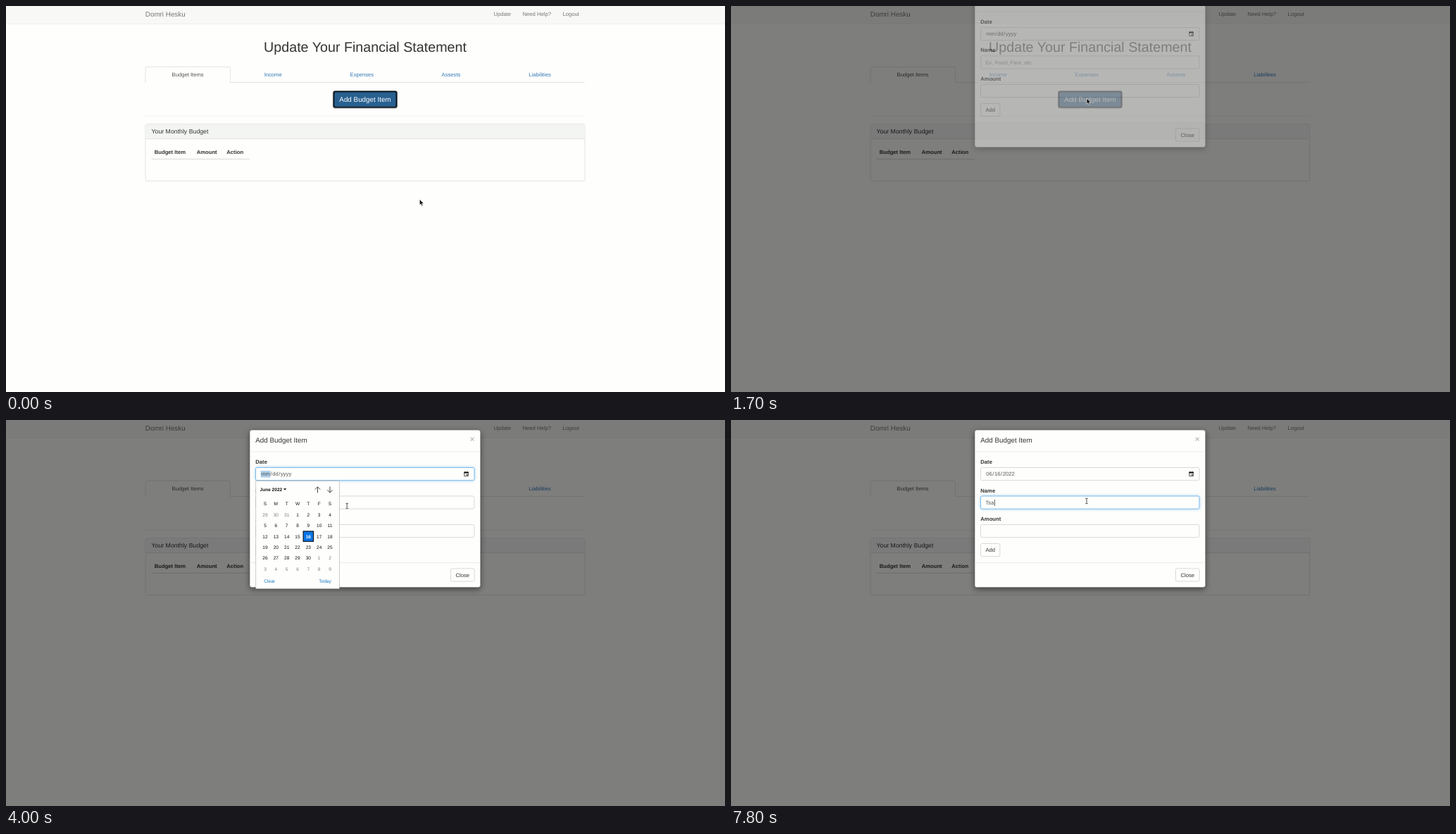
An HTML page for the animation above (8 s loop, 1021 by 548 pixels).

```html
<!DOCTYPE html>
<html lang="en">
<head>
<meta charset="utf-8">
<title>Budget form</title>
<style>
html, body { margin: 0; width: 100%; height: 100%; overflow: hidden; background: #fefefc; }
svg { display: block; width: 1021px; height: 548px; }
text {
  font-family: "Liberation Sans", Arial, sans-serif;
  font-size: 7.66px;
  fill: #333;
  text-rendering: geometricPrecision;
  white-space: pre;
}
.b { font-weight: bold; }
.mid { text-anchor: middle; }
.big { font-size: 9.85px; }
.cal text { font-size: 6.56px; fill: #111; }
</style>
</head>
<body>
<svg id="stage" viewBox="0 0 1021 548" xmlns="http://www.w3.org/2000/svg"></svg>
<script>
const LOOP = 8000, STEP = 100;
const WHITE = '#fefefc', LINK = '#337ab7', GREY = '#777';

// ---------- markup helpers ----------
const text = (x, y, s, cls = '', fill = '', extra = '') =>
  `<text x="${x}" y="${y}" class="${cls}" ${fill && `style="fill:${fill}"`} ${extra}>${s}</text>`;
const rect = (x, y, w, h, fill, extra = '') =>
  `<rect x="${x}" y="${y}" width="${w}" height="${h}" fill="${fill}" ${extra}/>`;
const line = (x1, x2, y, color, w = .6) =>
  `<path d="M${x1} ${y}H${x2}" stroke="${color}" stroke-width="${w}"/>`;
const box = (x, y, w, h, stroke, r = 2.2, extra = '') =>
  rect(x, y, w, h, WHITE, `rx="${r}" stroke="${stroke}" stroke-width=".65" ${extra}`);

// ---------- page behind the dialog ----------
function page() {
  const tabs = [['Income', 379.2], ['Expenses', 505.4], ['Assests', 632], ['Liabilities', 758]];
  return rect(0, 0, 1021, 548, WHITE) +
    rect(0, 0, 1021, 25.3, '#f8f8f6') + line(0, 1021, 25.4, '#e2e2e2') +
    text(197.8, 15, 'Domri Hesku', 'big', GREY) +
    text(692.4, 14.3, 'Update', '', GREY) +
    text(733.5, 14.3, 'Need Help?', '', GREY) +
    text(790.4, 14.3, 'Logout', '', GREY) +
    text(510, 65.1, 'Update Your Financial Statement', 'mid', '', 'font-size="19.7" id="title"') +
    line(198, 822, 108.5, '#d6d6d6') +
    `<path d="M198 108.9V88.6a2.2 2.2 0 0 1 2.2-2.2H316.4a2.2 2.2 0 0 1 2.2 2.2V108.9"
      fill="${WHITE}" stroke="#d6d6d6" stroke-width=".65"/>` +
    text(258.1, 100.3, 'Budget Items', 'mid', '#555') +
    tabs.map(([s, x]) => text(x, 100.3, s, 'mid', LINK)).join('') +
    rect(463.9, 120, 92.2, 25.4, '#8d9094', 'rx="3.6"') +
    rect(464.7, 120.8, 90.6, 23.8, '#0e1216', 'rx="3"') +
    rect(466.3, 122.3, 87.4, 20.8, '#286090', 'rx="1.8" stroke="#122b40" stroke-width=".5" id="addButton"') +
    text(510, 136, 'Add Budget Item', 'big mid', '#fff') +
    line(198, 822, 156.3, '#e8e8e8') +
    box(198, 167.7, 624, 80.7, '#d6d6d6') +
    rect(198.4, 168, 623.2, 20.6, '#f3f5f3') + line(198, 822, 188.6, '#d6d6d6') +
    text(206.5, 181.3, 'Your Monthly Budget', '', '', 'style="font-size:8.76px"') +
    text(210.8, 209.8, 'Budget Item', 'b') +
    text(270.7, 209.8, 'Amount', 'b') +
    text(313.3, 209.8, 'Action', 'b') +
    line(206.5, 346, 217.2, '#d6d6d6', 1.1);
}

// ---------- dialog ----------
const field = (y, id) =>
  rect(354.3, y, 311, 18.6, '#66afe9', `rx="2.2" filter="url(#glow)" id="${id}Glow"`) +
  box(354.5, y + .2, 310.5, 18.2, '#c4c4c4', 2.2, `id="${id}Box"`);

function dialog() {
  const icon = `<path d="M650.8 74.2h5.6v5.4h-5.6z" fill="none" stroke="#111" stroke-width=".7"/>` +
    rect(650.5, 73.7, 6.2, 1.9, '#111') + rect(651.5, 73, .8, 1, '#111') + rect(654.9, 73, .8, 1, '#111') +
    rect(653.9, 77, 1.6, 1.6, '#111');
  return rect(346.2, 16.9, 327.4, 223.4, '#000', 'rx="3.3" opacity=".5" filter="url(#shade)"') +
    rect(346.2, 14.2, 327.4, 223.4, WHITE, 'rx="3.3" stroke="#000" stroke-opacity=".25" stroke-width=".55"') +
    text(354.3, 32.4, 'Add Budget Item', 'big') +
    text(662, 31.3, '×', 'b mid', '#000', 'opacity=".25" id="cross"') +
    line(346.4, 673.4, 45, '#e0e0e0') +
    text(354.3, 62, 'Date', 'b') + field(67.3, 'date') +
    rect(361.7, 72, 10, 9.6, '#afd0ea', 'id="mark"') + '<g id="dateText"></g>' + icon +
    text(354.3, 102.5, 'Name', 'b') + field(107.8, 'name') +
    text(361.5, 119.9, '', '', '', 'id="nameText"') +
    rect(361.4, 113, .7, 9, '#222', 'id="caret"') +
    text(354.3, 143, 'Amount', 'b') + box(354.5, 148.5, 310.5, 18.2, '#c4c4c4') +
    box(354.5, 175.5, 27.4, 18.2, '#c4c4c4') + text(368.2, 187.3, 'Add', 'mid') +
    line(346.4, 673.4, 202.5, '#e0e0e0') +
    box(631.4, 210.9, 33.7, 18.2, '#c4c4c4') + text(648.3, 222.7, 'Close', 'mid');
}

// ---------- date picker ----------
function calendar() {
  const pitch = 15.33, left = 368, top = 134.5;
  const arrow = (x, turn) => `<path transform="translate(${x} 99) rotate(${turn})"
    d="M0 4.4V-4M-3.7 -.4L0 -4.1L3.7 -.4" fill="none" stroke="#333" stroke-width=".9"/>`;
  let s = text(360.5, 100.9, 'June 2022', 'b') +
    '<path d="M393.9 97.3h4.4l-2.2 2.5z" fill="#111"/>' + arrow(442.5, 0) + arrow(460, 180);
  [...'SMTWTFS'].forEach((d, i) => s += text(left + i * pitch, 121.1, d, 'mid'));
  for (let i = 0; i < 42; i++) {
    const n = i - 2;
    const x = left + i % 7 * pitch, y = top + Math.floor(i / 7) * pitch;
    const inMonth = n >= 1 && n <= 30;
    const label = n < 1 ? n + 31 : n > 30 ? n - 30 : n;
    if (n === 16) s += rect(x - 7.2, y - 7.2, 14.4, 14.4, '#0a75e8', 'stroke="#0a0a0a" stroke-width="1.1"');
    s += text(x, y + 2.35, label, n === 16 ? 'mid b' : 'mid', n === 16 ? '#fff' : inMonth ? '' : '#7d7d7d');
  }
  return s + text(374.2, 230.6, 'Clear', 'mid', '#1273bd') + text(453, 230.6, 'Today', 'mid', '#1273bd');
}

const pointers = `
  <path id="arrow" d="M0 0V8.2L1.9 6.5L3.2 9.6L4.7 9L3.4 6H5.9Z" fill="#111" stroke="#fff" stroke-width=".6"/>
  <path id="hand" d="M-.8 .2Q0 -.7 .8 .2V3.2L4 4Q5 4.3 4.9 5.4L4.2 9H-.6L-3 5.6Q-2.4 4.4 -.8 5.6Z"
    fill="#111" stroke="#fff" stroke-width=".6"/>
  <g id="beam" fill="none">
    <path d="M-1.8 -3.8Q0 -3.8 0 -3V3Q0 3.8 -1.8 3.8M1.8 -3.8Q0 -3.8 0 -3M0 3Q0 3.8 1.8 3.8" stroke="#fff" stroke-width="1.6"/>
    <path d="M-1.8 -3.8Q0 -3.8 0 -3V3Q0 3.8 -1.8 3.8M1.8 -3.8Q0 -3.8 0 -3M0 3Q0 3.8 1.8 3.8" stroke="#222" stroke-width=".8"/>
  </g>`;

const stage = document.getElementById('stage');
stage.innerHTML = `<defs>
    <filter id="glow" x="-5%" y="-60%" width="110%" height="220%"><feGaussianBlur stdDeviation="2.2"/></filter>
    <filter id="shade" x="-10%" y="-15%" width="120%" height="130%"><feGaussianBlur stdDeviation="4.1"/></filter>
  </defs>
  ${page()}
  ${rect(0, 0, 1021, 548, '#000', 'id="dim"')}
  <g id="dialog">${dialog()}</g>
  <g id="popup" class="cal">${rect(354.8, 86.7, 118.5, 152.8, WHITE, 'stroke="#a9a9a9" stroke-width=".6"')}
    <g id="days">${calendar()}</g></g>
  <g id="pointer">${pointers}</g>`;

const $ = id => document.getElementById(id);
$('title').style.fontSize = '19.7px';
$('cross').style.fontSize = '11.5px';

// ---------- motion ----------
const clamp = v => Math.max(0, Math.min(1, v));
const show = (id, on) => $(id).setAttribute('visibility', on ? 'inherit' : 'hidden');

// cubic-bezier(0, 0, .58, 1)
function easeOut(x) {
  let lo = 0, hi = 1;
  for (let i = 0; i < 24; i++) {
    const u = (lo + hi) / 2;
    if (1.74 * (1 - u) * u * u + u ** 3 < x) lo = u; else hi = u;
  }
  return 3 * (1 - lo) * lo * lo + lo ** 3;
}

// time, x, y
const path = [
  [300, 587.3, 274.4], [400, 584, 266], [600, 546, 205], [800, 513, 147], [1000, 505, 131],
  [2200, 505, 131], [2400, 482, 123], [2500, 528, 108], [2700, 611.4, 84.2], [2900, 638, 78.4],
  [3000, 638, 78.4], [3300, 651.3, 75], [3600, 651.3, 75], [3700, 640, 80], [3900, 530, 112],
  [4000, 484.2, 122], [4200, 443, 148], [4500, 429, 165],
  [5000, 429, 165], [5200, 446, 150], [5400, 488, 124], [5600, 505, 115]
];

function pointerAt(t) {
  const i = path.findIndex(p => p[0] > t);
  if (i === 0) return path[0].slice(1);
  if (i < 0) return path[path.length - 1].slice(1);
  const [t0, x0, y0] = path[i - 1], [t1, x1, y1] = path[i];
  const k = (t - t0) / (t1 - t0);
  return [x0 + (x1 - x0) * k, y0 + (y1 - y0) * k];
}

const inside = (x, y, l, t, r, b) => x > l && x < r && y > t && y < b;

function pointerKind(t, x, y) {
  if (t < 1600) return inside(x, y, 464, 120, 556, 145) ? 'hand' : 'arrow';
  if (t < 2000 || t >= 3500 && t < 5000 && x < 473) return 'arrow';
  const overText = inside(x, y, 354, 107.8, 665, 126.4) || inside(x, y, 354, 148.3, 665, 166.9);
  return overText ? 'beam' : 'arrow';
}

function setFocus(id, k) {
  $(id + 'Glow').setAttribute('opacity', .6 * k);
  const mix = (a, b) => Math.round(a + (b - a) * k);
  $(id + 'Box').setAttribute('stroke', `rgb(${mix(196, 102)},${mix(196, 175)},${mix(196, 233)})`);
  $(id + 'Box').setAttribute('stroke-width', .65 + .2 * k);
}

function setDate(parts, em) {
  const size = 7.66, pad = .55;
  let x = 361.65, s = '';
  parts.forEach((p, i) => {
    s += text(x + pad, 79.4, p, '', '#555');
    x += p.length * em[i] * size + 2 * pad;
    if (i === 0) $('mark').setAttribute('width', x - 361.7);
    if (i < 2) { s += text(x, 79.4, '/', '', '#555'); x += .278 * size; }
  });
  $('dateText').innerHTML = s;
}

function draw(t) {
  $('addButton').setAttribute('fill', t === 1400 ? '#204d74' : '#286090');
  $('addButton').setAttribute('stroke', t >= 800 && t < 1600 ? '#204d74' : '#122b40');
  $('dim').setAttribute('opacity', .5 * clamp((t - 1484) / 150));

  const since = t - 1634;
  $('dialog').setAttribute('opacity', clamp(since / 150));
  $('dialog').setAttribute('transform', `translate(0 ${-55.9 * (1 - easeOut(clamp(since / 300)))})`);

  const swap = clamp((t - 6000) / 200);
  setFocus('date', clamp((t - 3300) / 200) * (1 - swap));
  setFocus('name', swap);
  show('mark', t >= 3400 && t < 6100);
  if (t < 5000) setDate(['mm', 'dd', 'yyyy'], [.833, .556, .5]);
  else setDate(['06', '16', '2022'], [.556, .556, .556]);

  show('popup', t >= 3500 && t < 5000);
  show('days', t >= 3700 && t < 5000);

  const typed = 'Tsa'.slice(0, t < 7200 ? 0 : 1 + Math.floor((t - 7200) / 300));
  $('nameText').textContent = typed || 'Ex. Food, Fare, etc.';
  $('nameText').style.fill = typed ? '#555' : '#999';
  const typedWidth = [0, .611, 1.111, 1.667][typed.length] * 7.66;
  $('caret').setAttribute('x', 361.3 + typedWidth);
  show('caret', t >= 6200 && t < 6700 || t >= 7200);

  const [x, y] = pointerAt(t), kind = pointerKind(t, x, y);
  $('pointer').setAttribute('transform', `translate(${x} ${y})`);
  for (const k of ['arrow', 'hand', 'beam']) show(k, k === kind);
}

const start = performance.now();
let last = -1;
function tick() {
  const t = Math.floor((performance.now() - start) % LOOP / STEP) * STEP;
  if (t !== last) draw(last = t);
  requestAnimationFrame(tick);
}
tick();
</script>
</body>
</html>
```
